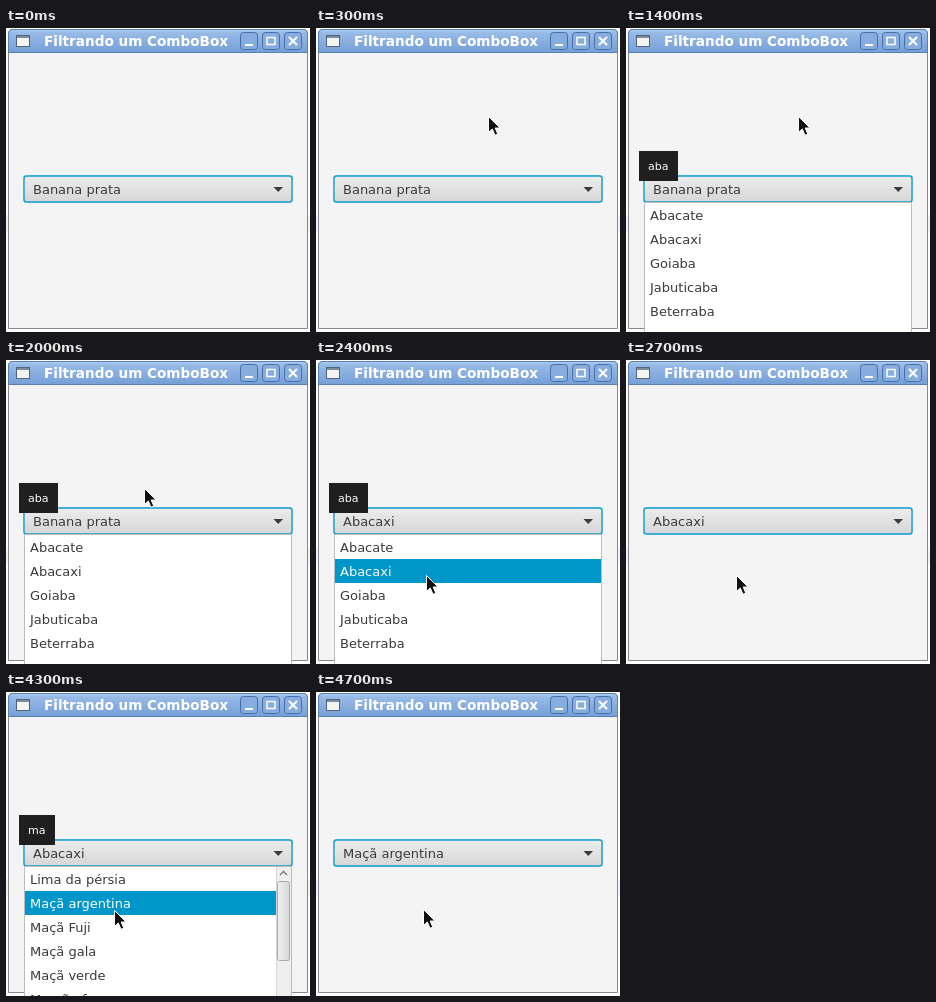
An HTML page for the animation above (4.9 s loop, 304 by 304 pixels).

```html
<!DOCTYPE html>
<html lang="pt">
<head>
<meta charset="utf-8">
<title>Filtrando um ComboBox</title>
<style>
  html, body { margin: 0; width: 100%; height: 100%; overflow: hidden; background: #fff; }
  svg { display: block; width: 100%; height: 100%; }
  text { font: 13px "DejaVu Sans", sans-serif; fill: #3a3a3a; white-space: pre; }
  .title { font-size: 13.6px; font-weight: bold; fill: #fff; }
  .tip text { font-size: 11.05px; fill: #fff; }
  .hot { fill: #fff; }
</style>
</head>
<body>
<svg viewBox="0 0 304 304">
  <defs>
    <linearGradient id="bar" x2="0" y2="1">
      <stop offset="0" stop-color="#b2cdef"/>
      <stop offset=".15" stop-color="#98bae6"/>
      <stop offset="1" stop-color="#759fd6"/>
    </linearGradient>
    <linearGradient id="face" x2="0" y2="1">
      <stop offset="0" stop-color="#ededed"/>
      <stop offset="1" stop-color="#d6d6d6"/>
    </linearGradient>
    <linearGradient id="grip">
      <stop offset="0" stop-color="#f0f0f0"/>
      <stop offset="1" stop-color="#d8d8d8"/>
    </linearGradient>
  </defs>

  <path d="M0 187h304v17H0z" fill="#f1f2fb"/>
  <path d="M2.5 300.5V6q0-4.5 4.5-4.5h290q4.500 4.500 4.500v294.500z" fill="none"/>
  <path d="M2.500 300.500V6Q2.500 1.500 7 1.500H297Q301.500 1.500 301.500 6V300.500Z" fill="#f4f4f4" stroke="#85878c"/>
  <path d="M2.500 24.500V6Q2.500 1.500 7 1.500H297Q301.500 1.500 301.500 6V24.500Z" fill="url(#bar)" stroke="#5780b5"/>

  <g>
    <rect x="10.500" y="7.500" width="13" height="11" fill="#f3f3ef" stroke="#51657f"/>
    <path d="M11 9h12" stroke="#7c8c9e" stroke-width="2"/>
  </g>
  <text class="title" x="38" y="18">Filtrando um ComboBox</text>
  <g fill="#87addf" stroke="#456fa8">
    <rect x="234.500" y="4.500" width="17" height="17" rx="3"/>
    <rect x="256.500" y="4.500" width="17" height="17" rx="3"/>
    <rect x="278.500" y="4.500" width="17" height="17" rx="3"/>
  </g>
  <g fill="none" stroke="#fff" stroke-width="2">
    <path d="M239 17h8M283 9l8 8m0-8l-8 8"/>
    <path d="M261 9.500h8v7h-8z" stroke-width="1.500"/>
  </g>

  <rect x="17" y="147" width="270" height="28" rx="3.500" fill="#b5dfee"/>
  <rect x="18" y="148" width="268" height="26" rx="2.500" fill="url(#face)" stroke="#16a0cf" stroke-width="1.400"/>
  <path d="M267.500 159h9.500l-4.750 5z" fill="#3c3c3c"/>
  <text id="value" x="27" y="166"></text>

  <g id="popup">
    <path d="M18.500 305V174.500H285.500V305" fill="#fff" stroke="#bcbcbc"/>
    <rect id="highlight" x="19" height="24" fill="#0096c9"/>
    <g id="rows"></g>
    <g id="scroll">
      <path d="M270 175h15v130h-15z" fill="#efefef"/>
      <path d="M270.500 175v130" stroke="#d5d5d5"/>
      <path d="M274 183l3.500-3.500l3.500 3.500" fill="none" stroke="#777" stroke-width="1.300"/>
      <rect id="thumb" x="271.500" y="189.500" width="12" rx="2" fill="url(#grip)" stroke="#aaa"/>
    </g>
  </g>

  <g class="tip" id="tip">
    <rect id="tipBox" x="13" y="123" height="30" fill="#1f1f1f"/>
    <text id="typed" x="22" y="142"></text>
  </g>

  <path id="cursor" d="M.5 .5V16.500L4.300 13L7 19.300L9.800 18.100L7.200 12H12Z"
        fill="#111" stroke="#fff" stroke-width="1"/>
</svg>

<script>
const LOOP = 4900;
const ROW_TOP = 175, ROW_HEIGHT = 24;
const $ = id => document.getElementById(id);

const list = (names, thumb) => ({ names: names.split(','), thumb });
const lists = {
  a: list('Abacate,Abacaxi,Ameixa,Amora,Araticum,Atemoia', 19),
  aba: list('Abacate,Abacaxi,Goiaba,Jabuticaba,Beterraba', 0),
  m: list('Ameixa,Amora,Araticum,Atemoia,Carambola,Framboesa', 28),
  ma: list('Lima da pérsia,Maçã argentina,Maçã Fuji,Maçã gala,Maçã verde,Mamão formosa', 79)
};
lists.ab = lists.aba;

// Tooltip widths follow the text: its advance plus padding on both sides.
const tipWidth = { a: 25, ab: 32, aba: 39, m: 29, ma: 36 };

// Each step changes only the listed properties.
const steps = [
  [0, { value: 'Banana prata', typed: '', hot: -1, cursor: null }],
  [100, { cursor: [33, 2] }],
  [200, { cursor: [115, 54] }],
  [300, { cursor: [172, 88] }],
  [1200, { typed: 'a' }],
  [1300, { typed: 'ab' }],
  [1400, { typed: 'aba' }],
  [1800, { cursor: [167, 94] }],
  [1900, { cursor: [154, 109] }],
  [2000, { cursor: [138, 128] }],
  [2100, { cursor: [125, 161] }],
  [2200, { cursor: [114, 193], hot: 0 }],
  [2300, { cursor: [110, 215], hot: 1 }],
  [2400, { value: 'Abacaxi' }],
  [2500, { typed: '', hot: -1 }],
  [3700, { typed: 'm' }],
  [3800, { typed: 'ma' }],
  [4300, { cursor: [108, 218], hot: 1 }],
  [4400, { cursor: [107, 217] }],
  [4700, { value: 'Maçã argentina', typed: '', hot: -1 }]
];

const show = (el, on) => el.style.display = on ? '' : 'none';

function drawRows(names, hot) {
  $('rows').replaceChildren(...names.map((name, i) => {
    const row = document.createElementNS($('rows').namespaceURI, 'text');
    row.setAttribute('x', 24);
    row.setAttribute('y', ROW_TOP + ROW_HEIGHT * i + 17);
    if (i === hot) row.setAttribute('class', 'hot');
    row.textContent = name;
    return row;
  }));
}

function draw({ value, typed, hot, cursor }) {
  $('value').textContent = value;
  show($('cursor'), cursor);
  if (cursor) $('cursor').setAttribute('transform', `translate(${cursor})`);

  show($('popup'), typed);
  show($('tip'), typed);
  if (!typed) return;

  const { names, thumb } = lists[typed];
  $('typed').textContent = typed;
  $('tipBox').setAttribute('width', tipWidth[typed]);
  drawRows(names, hot);
  show($('highlight'), hot >= 0);
  $('highlight').setAttribute('y', ROW_TOP + ROW_HEIGHT * hot);
  $('highlight').setAttribute('width', thumb ? 251 : 266);
  show($('scroll'), thumb);
  $('thumb').setAttribute('height', thumb);
}

const start = performance.now();
let shown = -1;

function tick() {
  const time = (performance.now() - start) % LOOP;
  const index = steps.findLastIndex(([at]) => at <= time);
  if (index !== shown) {
    draw(Object.assign({}, ...steps.slice(0, index + 1).map(step => step[1])));
    shown = index;
  }
  requestAnimationFrame(tick);
}
tick();
</script>
</body>
</html>
```
